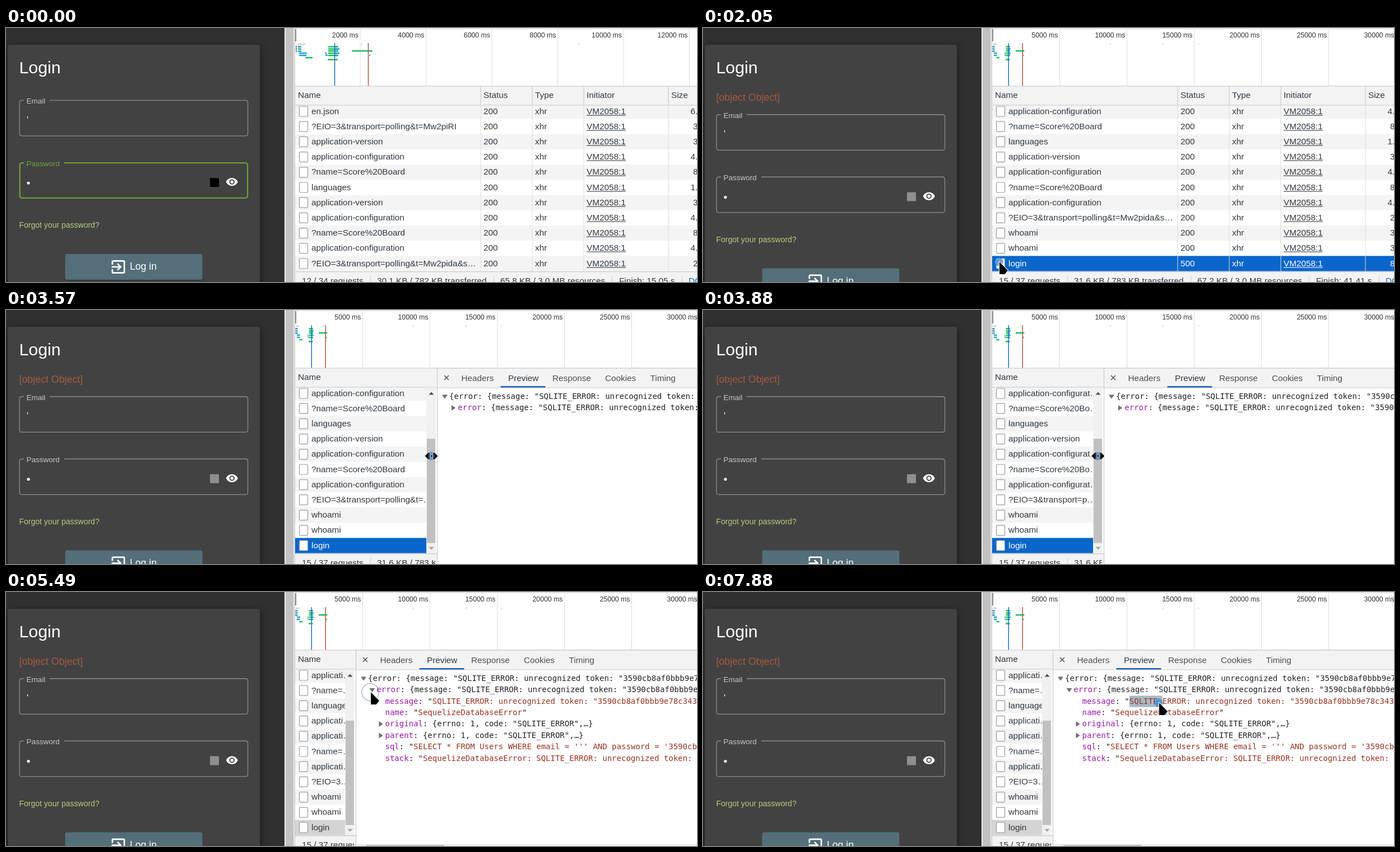
Write an HTML page that moves like this. It is 1233 px wide and 454 px high and loops after 8000 ms.

```html
<!DOCTYPE html>
<html lang="en">
<head>
<meta charset="utf-8">
<title>Login error preview</title>
<style>
html, body { margin: 0; width: 100%; height: 100%; overflow: hidden; background: #fff; }
svg { display: block; width: 1233px; height: 454px; }
text { font: 15.3px "Liberation Sans", Arial, sans-serif; fill: #303942; white-space: pre; }
.mono { font: 14px "DejaVu Sans Mono", monospace; fill: #222; }
.axis { font-size: 12.3px; fill: #333; text-anchor: end; }
.key { fill: #9a1ba6; }
.str { fill: #963424; }
.red text { fill: #9c3a28; }
.pick text { fill: #fff; }
#card { filter: drop-shadow(0 4px 7px rgba(0, 0, 0, .5)); }
</style>
</head>
<body>
<svg id="stage" viewBox="0 0 1233 454">
  <defs>
    <clipPath id="right"><rect x="516" y="0" width="717" height="454"/></clipPath>
    <clipPath id="rows"><rect id="rowsBox" x="516" y="138" width="717" height="297"/></clipPath>
    <clipPath id="foot"><rect id="footBox" x="516" y="435" width="717" height="19"/></clipPath>
  </defs>
  <rect width="497" height="454" fill="#303030"/>
  <rect id="card" x="3" y="30" width="450" height="500" rx="4" fill="#424242"/>
  <g id="form"></g>
  <rect x="497" width="1.500" height="454" fill="#fff"/>
  <rect x="498.500" width="14.500" height="454" fill="#c2c2c2"/>
  <rect x="513" width="2" height="454" fill="#eee"/>
  <rect x="514.500" width="1.500" height="454" fill="#ccc"/>
  <g id="overview" clip-path="url(#right)"></g>
  <g id="table"></g>
  <g id="detail"></g>
  <g id="pointer"></g>
</svg>
<script>
const LOOP = 8000;
const ROW = 27.2;
const SIZE = "15.3px 'Liberation Sans', Arial, sans-serif";
const RESULT_AT = 1000, OPEN_AT = 2080, GRAB_AT = 3520, EXPAND_AT = 5350, SELECT_AT = 6880;

const $ = id => document.getElementById(id);
const pen = document.createElement("canvas").getContext("2d");
const esc = s => s.replace(/&/g, "&amp;").replace(/</g, "&lt;");
const rect = (x, y, w, h, fill, more = "") =>
  `<rect x="${x}" y="${y}" width="${w}" height="${h}" fill="${fill}" ${more}/>`;
const text = (x, y, s, more = "") => `<text x="${x}" y="${y}" ${more}>${esc(s)}</text>`;
const path = (d, fill, more = "") => `<path d="${d}" fill="${fill}" ${more}/>`;
const vline = (x, y1, y2, color) => rect(x - 0.5, y1, 1, y2 - y1, color);

function textWidth(s) {
  pen.font = SIZE;
  return pen.measureText(s).width;
}

// Redraw a group only when its markup changes.
const last = {};
function put(id, html) {
  if (last[id] !== html) $(id).innerHTML = last[id] = html;
}

// ---- pointer: time, x, y ----
const TRACK = [
  [40, 328, 368], [90, 324, 372], [290, 324, 372], [620, 256, 423], [900, 256, 423],
  [1100, 256, 416], [1250, 256, 416], [1590, 560, 424], [1900, 528, 418], [2490, 528, 418],
  [2740, 833, 254], [2900, 833, 254], [3210, 768, 261], [3520, 768, 261], [3880, 705, 261],
  [4320, 643, 261], [4420, 641, 261], [4750, 614, 261], [4900, 614, 261], [5140, 650, 179],
  [5560, 650, 179], [5980, 786, 240], [6780, 762, 190], [6880, 762, 190], [7300, 776, 198],
  [7670, 787, 192], [7880, 813, 198]
];
const PRESSES = [[810, 890], [2000, 2080], [3500, 4800], [5270, 5350], [6860, 9000]];

function pointerAt(t) {
  const i = TRACK.findIndex(k => k[0] > t);
  if (i < 0) return TRACK[TRACK.length - 1].slice(1);
  if (i === 0) return TRACK[0].slice(1);
  const a = TRACK[i - 1], b = TRACK[i];
  let k = (t - a[0]) / (b[0] - a[0]);
  const dragging = t > GRAB_AT && t < 4750 || t > SELECT_AT;
  if (!dragging) k = k * k * (3 - 2 * k);
  return [a[1] + (b[1] - a[1]) * k, a[2] + (b[2] - a[2]) * k];
}

function drawPointer(t, x, y) {
  if (t < 40) return "";
  let out = "";
  for (const [down, up] of PRESSES) {
    if (t >= down && t < up) out += `<circle r="7.500" fill="#4a90d9" opacity=".85"/>`;
    const k = (t - up) / 250;
    if (k >= 0 && k < 1)
      out += `<circle r="${4 + 20 * k}" fill="none" stroke="#5f8fb0" stroke-width="1.300" opacity="${1 - k * 0.6}"/>`;
  }
  out += t > 3120 && t < 4880
    ? path("M-11.500 0L-5 -6.500V6.500ZM11.500 0L5 -6.500V6.500ZM-4.500 -6h1.500v12h-1.500ZM3 -6h1.500v12h-1.500ZM-1.500 -1.500h3v3h-3Z",
        "#000", 'stroke="#fff" stroke-width="1" paint-order="stroke"')
    : path("M1 0V22H10.500L16 15.500Z", "#000",
        'stroke="#fff" stroke-width="2" paint-order="stroke" stroke-linejoin="round"');
  return `<g transform="translate(${x.toFixed(2)} ${y.toFixed(2)})">${out}</g>`;
}

// ---- login form ----
function field(top, label, notch, focused) {
  const w = focused ? 2.3 : 1.3;
  const l = 23.5 + w / 2, r = 432.2 - w / 2, y = top + w / 2, b = top + 65 - w / 2;
  return path(`M32 ${y}H${l + 4.5}Q${l} ${y} ${l} ${y + 4.5}V${b - 4.5}Q${l} ${b} ${l + 4.5} ${b}H${r - 4.5}Q${r} ${b} ${r} ${b - 4.5}V${y + 4.5}Q${r} ${y} ${r - 4.5} ${y}H${notch}`,
    "none", `stroke="${focused ? "#689f38" : "#8c8c8c"}" stroke-width="${w}"`) +
    text(36.5, top + 6.5, label, `style="font-size:13.5px;fill:${focused ? "#6ea53c" : "#c6c6c6"}"`);
}

const EYE = "M12 4.500C7 4.500 2.730 7.610 1 12c1.730 4.390 6 7.500 11 7.500s9.270-3.110 11-7.500c-1.730-4.390-6-7.500-11-7.500zM12 17a5 5 0 1 1 0-10 5 5 0 0 1 0 10zM12 9a3 3 0 1 0 0 6 3 3 0 0 0 0-6z";
const ENTER = "M10.090 15.590L11.500 17l5-5-5-5-1.410 1.410L12.670 11H3v2h9.670zM19 3H5a2 2 0 0 0-2 2v4h2V5h14v14H5v-4H3v4a2 2 0 0 0 2 2h14a2 2 0 0 0 2-2V5a2 2 0 0 0-2-2z";

function drawForm(t) {
  const failed = t >= RESULT_AT, dy = failed ? 25.6 : 0;
  const pressed = t >= 860 && t < 1350;
  const white = size => `style="font-size:${size}px;fill:#fff"`;
  let out = text(23.5, 80.5, "Login", white(30.3));
  if (failed) out += text(23.5, 129.5, "[object Object]", 'style="font-size:17.8px;fill:#a4583f"');
  out += `<g transform="translate(0 ${dy})">` +
    field(128.5, "Email", 78, false) + text(37, 169.5, "'", white(16)) +
    field(240, "Password", 104, t < 860) +
    '<circle cx="40" cy="277" r="2.600" fill="#fff"/>' +
    rect(364, 268, 16, 16, failed ? "#8f8f8f" : "#000", 'rx="1"') +
    path(EYE, "#fff", 'fill-rule="evenodd" transform="translate(391.800 263.700) scale(.95)"') +
    text(23.5, 357, "Forgot your password?", 'style="font-size:14px;fill:#b5cc7a"');
  if (t >= 40 && t < 340) out += rect(23.5, 358, 143.5, 1, "#b5cc7a");
  return out +
    rect(105.5, 406, 245, 46, "#000", 'rx="4" opacity=".18"') +
    rect(105.5, 404, 245, 46, pressed ? "#757c82" : "#546e7a", 'rx="4"') +
    path(ENTER, "#fff", 'transform="translate(184.500 411) scale(1.330)"') +
    text(221, 432, "Log in", white(17.6)) + "</g>";
}

// ---- timeline overview ----
const BLUE = "#1a9fd6", GREEN = "#14bf57", GREY = "#ccc";
const BARS = [
  [520, 14, 29, GREY], [534, 13, 53, GREEN], [523, 14, 45, BLUE], [523, 13, 49, BLUE],
  [569, 3, 45, BLUE], [570, 4, 48.5, BLUE], [574, 18, 56.5, GREEN], [617, 37, 41, GREEN],
  [648, 2, 49, BLUE], [634, 2, 29, GREY], [1022, 2, 29, GREY], [1249, 2, 29, GREY], [1401, 2, 29, GREY]
];
for (const y of [33.5, 37.5, 41.5]) BARS.push([517, 2, y, "#55b"], [521, 3, y, GREEN], [523, 4, y, BLUE]);
for (const y of [33.5, 37.5, 41, 45, 49]) BARS.push([575, 18, y, GREEN], [587, y === 37.5 || y === 45 ? 8 : 4, y, BLUE]);

function drawOverview(failed) {
  const [first, gap, step] = failed ? [636.5, 120, 5000] : [632, 117.5, 2000];
  const scale = failed ? 0.415 : 1;
  const at = x => 516 + (x - 516) * scale;
  let out = rect(516, 0, 717, 104, "#fff") + rect(516, 0.5, 717, 1, "#ccc");
  for (let i = 0; i < 6; i++) {
    const x = first + gap * i;
    out += vline(x, 2, 104, "#ddd") + text(x - 3, 17, step * (i + 1) + " ms", 'class="axis"');
  }
  for (const [x, w, y, color] of BARS) out += rect(at(x), y - 1.25, Math.max(w * scale, 1.5), 2.5, color);
  out += rect(at(586.5) - 0.75, 27, 1.5, 77, "#1d6fb8") + rect(at(646.5) - 0.75, 27, 1.5, 77, "#b0563f");
  return out + rect(516, 2, 2, 22, "#8a8a8a");
}

// ---- request table ----
const VERSION = ["application-version", "3"], CONFIG = ["application-configuration", "4."];
const SCORE = ["?name=Score%20Board", "8"], WHO = ["whoami", "3"], LANGS = ["languages", "1."];
const REQUESTS = [
  ["en.json", "6."], ["?EIO=3&transport=polling&t=Mw2piRI", "3"], VERSION, CONFIG, SCORE, LANGS,
  VERSION, CONFIG, SCORE, CONFIG, ["?EIO=3&transport=polling&t=Mw2pida&sid=k3", "2"],
  WHO, WHO, ["login", "8"]
];
const COLUMNS = [[847, "Status"], [939, "Type"], [1031, "Initiator"], [1182, "Size"]];

function fit(s, room) {
  if (textWidth(s) <= room) return s;
  while (s && textWidth(s + "…") > room) s = s.slice(0, -1);
  return s + "…";
}

function drawTable(t, split) {
  const failed = t >= RESULT_AT, open = split < 1233;
  const edge = open ? split - 19 : 1233;
  const nameEnd = open ? split : 847;
  $("rowsBox").setAttribute("width", edge - 516);
  $("footBox").setAttribute("width", (open ? split - 3 : 1233) - 516);

  const shown = REQUESTS.slice(failed ? 3 : 0).slice(0, 11);
  let rows = "";
  shown.forEach(([name, size], i) => {
    const mid = 149 + ROW * i, base = Math.floor(mid) + 5;
    const isLogin = name === "login";
    const picked = isLogin && t >= 2000;
    let bg = i % 2 ? "#fff" : "#f4f4f4";
    if (picked) bg = t < EXPAND_AT ? "#0a66cb" : "#d4d4d4";
    const style = picked ? (t < EXPAND_AT ? "pick" : "") : isLogin ? "red" : "";
    let row = rect(516, mid - ROW / 2, 717, ROW, bg) +
      rect(523.5, mid - 9, 15, 18, "#fff", 'rx="1.500" stroke="#999" stroke-width="1.200"') +
      text(545, base, fit(name, nameEnd - 7 - 545));
    if (!open) {
      const ink = style === "pick" ? "#fff" : style === "red" ? "#9c3a28" : "#303942";
      row += text(852, base, isLogin ? "500" : "200") + text(944, base, "xhr") +
        text(1036, base, "VM2058:1") + rect(1036, base + 1.5, textWidth("VM2058:1"), 1.1, ink) +
        text(size.length > 1 ? 1221.5 : 1226, base, size);
    }
    rows += `<g class="${style}">${row}</g>`;
  });

  let out = rect(516, 104, 717, 350, "#fff") + `<g clip-path="url(#rows)">${rows}</g>` +
    rect(516, 103.5, 717, 34.5, "#f3f3f3") + rect(516, 103.5, 717, 1, "#c8c8c8") +
    rect(516, 137.5, 717, 1, "#c8c8c8") + text(521, 125, "Name");
  if (!open)
    for (const [x, label] of COLUMNS)
      out += vline(x, 104, 138, "#c4c4c4") + vline(x, 138, 435, "#ddd") + text(x + 5, 125, label);

  const totals = failed
    ? ["15 / 37 requests", "31.6 KB / 783 KB transferred", "67.2 KB / 3.0 MB resources", "Finish: 41.41 s"]
    : ["12 / 34 requests", "30.1 KB / 782 KB transferred", "65.8 KB / 3.0 MB resources", "Finish: 15.05 s"];
  const stops = [528, 662, 882, 1094];
  let foot = totals.map((s, i) => text(stops[i], 457, s)).join("") +
    text(1218, 457, "DOMContentLoaded", 'style="fill:#1468c0"');
  for (const x of [650.5, 870.5, 1081.5, 1206.5]) foot += vline(x, 443, 454, "#ccc");
  out += rect(516, 435, 717, 19, "#f3f3f3") + rect(516, 435, 717, 1.2, "#c8c8c8") +
    `<g clip-path="url(#foot)">${foot}</g>`;

  if (open) {
    const c = split - 10;
    out += rect(edge, 138.5, 17, 296.5, "#f1f1f1") + rect(edge + 1, 230, 15, 186.5, "#c1c1c1") +
      path(`M${c - 4.5} 151.500h9l-4.500 -5z`, "#505050") + path(`M${c - 4.5} 423.500h9l-4.500 5z`, "#a3a3a3");
  }
  return out;
}

// ---- response preview ----
const HASH = "3590cb8af0bbb9e78c343b52b93773c9";
const FAULT = `SQLITE_ERROR: unrecognized token: "${HASH}"`;
const TABS = [[43.5, "Headers"], [127, "Preview"], [206, "Response"], [300, "Cookies"], [380.5, "Timing"]];
const span = (cls, s) => `<tspan class="${cls}">${esc(s)}</tspan>`;
const pair = (key, value) => span("key", key) + ": " + value;
const quoted = s => `"${span("str", s)}"`;
const inner = '{errno: 1, code: "SQLITE_ERROR",…}';
const FIELDS = [
  ["message", quoted(FAULT)], ["name", quoted("SequelizeDatabaseError")],
  ["original", inner], ["parent", inner],
  ["sql", quoted(`SELECT * FROM Users WHERE email = ''' AND password = '${HASH}'`)],
  ["stack", quoted("SequelizeDatabaseError: " + FAULT)]
];

function drawDetail(t, split, x) {
  if (split >= 1233) return "";
  const d = split, expanded = t >= EXPAND_AT;
  const line = (i, dx, html) => `<text class="mono" x="${d + dx}" y="${Math.floor(159.3 + 20.4 * i)}">${html}</text>`;
  const arrow = (i, dx, down) => {
    const cx = d + dx, cy = 154.5 + 20.4 * i;
    return path(down ? `M${cx - 5} ${cy - 3}h10l-5 7z` : `M${cx - 3.5} ${cy - 5}v10l7 -5z`, "#6e6e6e");
  };
  let out = rect(d, 104, 1233 - d, 350, "#fff") + rect(d, 104, 1233 - d, 34.5, "#f3f3f3") +
    rect(d, 103.5, 1233 - d, 1, "#c8c8c8") + rect(d, 138.5, 1233 - d, 1, "#c8c8c8") +
    rect(d, 104, 1, 350, "#c4c4c4") +
    path(`M${d + 13} 117l8 8m0 -8l-8 8`, "none", 'stroke="#555" stroke-width="1.600"');
  for (const [dx, label] of TABS)
    out += text(d + dx, 127, label, `style="fill:${label === "Preview" ? "#303942" : "#4a4f55"}"`);
  out += rect(d + 113.5, 136, 80, 2.5, "#1a5fb8");

  if (t >= SELECT_AT) {
    const count = Math.max(0, Math.ceil((x - 760.8) / 8.43));
    out += rect(d + 136.8, 185.3, count * 8.43, 20.4, "#a9b9c6");
  }
  out += arrow(0, 14, true) + line(0, 22, esc(`{error: {message: "${FAULT}",…}}`)) +
    arrow(1, 29.5, expanded) + line(1, 37.3, pair("error", esc(`{message: "${FAULT}",…}`)));
  if (expanded) {
    FIELDS.forEach(([key, value], i) => {
      if (value === inner) out += arrow(i + 2, 45, false);
      out += line(i + 2, 52.5, pair(key, value));
    });
    out += rect(d + 1, 451, 1233 - d, 3, "#f1f1f1") + rect(d + 1, 450.5, 1233 - d, 0.8, "#ddd") +
      rect(643, 452, 139, 2, "#c1c1c1");
  }
  return out;
}

function render(t) {
  const [x, y] = pointerAt(t);
  let split = 1233;
  if (t >= OPEN_AT) split = t < GRAB_AT ? 778 : t < 4750 ? Math.round(x) + 10 : 624;
  put("form", drawForm(t));
  put("overview", drawOverview(t >= RESULT_AT));
  put("table", drawTable(t, split));
  put("detail", drawDetail(t, split, x));
  put("pointer", drawPointer(t, x, y));
}

const start = performance.now();
function tick() {
  render((performance.now() - start) % LOOP);
  requestAnimationFrame(tick);
}
tick();
</script>
</body>
</html>
```
